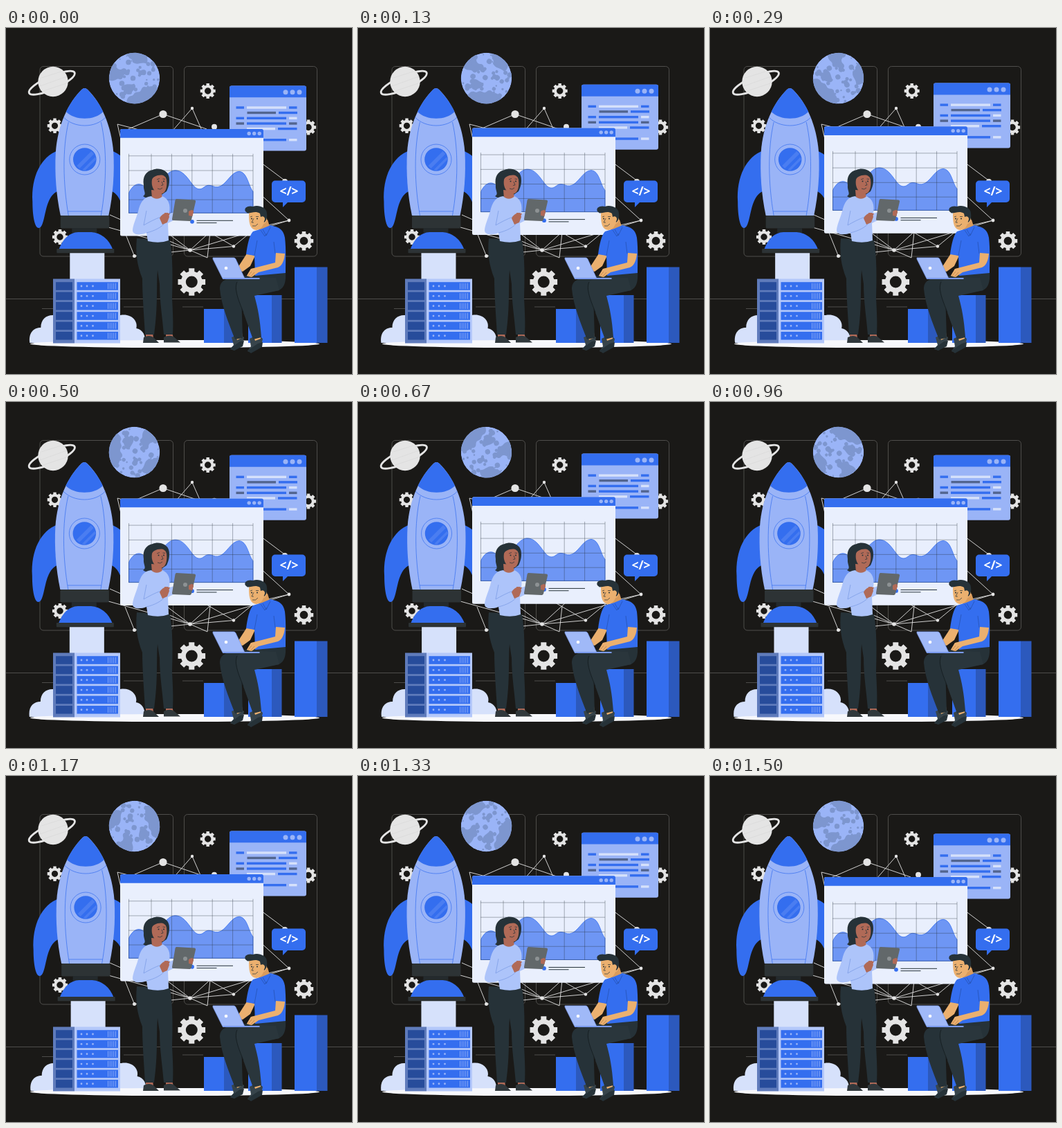
These frames come from a looping animation (500 by 500 pixels, 1540 ms). An HTML page:

```html
<!DOCTYPE html>
<html lang="en">
<head>
<meta charset="utf-8">
<style>
html, body { margin: 0; width: 100%; height: 100%; overflow: hidden; background: #1a1917; }
svg { display: block; width: 100vw; height: 100vh; }
.b { fill: #346eef; } .l { fill: #9ab4f7; } .p { fill: #d6e1fb; } .d { fill: #263238; }
.n { fill: #2c59bd; } .g { fill: #e4e4e4; } .w { fill: #b06a57; } .m { fill: #ebb06f; }
.line { fill: none; stroke: #346eef; stroke-width: .7; }
.ink { fill: none; stroke: #263238; stroke-width: .7; }
</style>
</head>
<body>
<svg viewBox="0 0 500 500">
  <defs><clipPath id="disc"><circle r="36.8"/></clipPath></defs>

  <g fill="none" stroke="#5c5b59" stroke-width=".8">
    <rect x="49" y="55.5" width="192.5" height="274.5" rx="5"/>
    <rect x="257.5" y="55.5" width="192" height="274.5" rx="5"/>
    <path d="M0 391.5H500M52 405.5H70M170 403H200M255 403H285"/>
  </g>
  <g id="gears" class="g"></g>

  <g stroke="#e4e4e4" stroke-width=".9" fill="none">
    <path d="M170 178L161 139L200 149M170 149L227 124.5L290 146M241 148L269 116L284 150M365 192L405 222M365 238L409 278L365 288M409 278L266 321L148 288M150 270L266 321L329 315.5L372 280M172 296L185.5 329.5L266 321L291 332L295 295M266 321L225 290M266 321L300 290M329 315.5L285 290"/>
  </g>
  <g id="nodes" class="g"></g>

  <ellipse cx="66.300" cy="79.200" rx="36" ry="9.500" transform="rotate(-24 66.300 79.200)" fill="none" stroke="#e4e4e4" stroke-width="2.900"/>
  <circle cx="68" cy="77.500" r="21.700" class="g"/>
  <path d="M51 72L80 63M49 84L88 70M54 91L87 80" stroke="#dadada" stroke-width=".8"/>

  <g transform="translate(185.500 72.600)"><g id="moon" clip-path="url(#disc)" fill="#7d96cf">
    <circle r="36.800" class="l"/>
    <path transform="rotate(30)" d="M37 -6C27 -9 25 1 19 2C14 6 21 10 15 14C9 18 15 21 9 25C5 31 12 37 12 40L40 30Z"/>
    <path d="M-35 -14C-27 -17 -25 -9 -19 -12C-14 -16 -9 -10 -12 -5C-19 -5 -14 3 -21 3C-26 0 -27 8 -37 5Z"/>
    <path d="M-14 -37C-12 -27 -5 -30 -3 -23C3 -18 9 -25 16 -22C20 -28 14 -33 16 -39Z"/>
    <path d="M-18 14C-11 6 -5 11 0 8C6 13 -1 17 -4 23C-12 27 -11 18 -18 14Z"/>
  </g></g>

  <g class="float">
    <rect x="323" y="83.200" width="111" height="94" rx="3" class="l"/>
    <path d="M323 100V86.200a3 3 0 0 1 3-3H431a3 3 0 0 1 3 3V100Z" class="b"/>
    <g id="code"></g>
  </g>

  <g id="rocket">
    <path d="M92 320H142V440H92Z" class="p"/>
    <path d="M34 455C32 440 40 433 50 433C50 420 59 414 69 415H165C180 412 191 423 188 434C198 436 202 445 200 455Z" class="p"/>
    <path id="fin" d="M75 177C50 186 36 215 38 251C38 271 41 289 47 289C54 289 55 268 60 254C65 241 70 237 77 235Z" class="b"/>
    <use href="#fin" transform="translate(226.600) scale(-1 1)"/>
    <path d="M78.500 271C72 240 70 210 71.500 180C74 140 90 108 109 89Q113.300 85 117.600 89C137 108 152 140 155 180C156.500 210 154.500 240 148 271Z" class="l"/>
    <path d="M86.500 121C93 108 100 98 109 89Q113.300 85 117.600 89C126 98 134 108 140 121C128 134 99 134 86.500 121Z" class="b"/>
    <path d="M83 129C98 145 129 145 143.500 129M90 136C81 175 82 225 90 271M137 136C146 175 145 225 137 271M89 265H138" class="line"/>
    <circle cx="113.500" cy="190" r="22" class="line"/>
    <circle cx="113.500" cy="190" r="16.800" class="b"/>
    <path d="M102 199L123 178L127 182L106 203ZM110 205L128.500 186.500L130 190L114 206Z" fill="#4a7df1"/>
    <rect x="78.500" y="271" width="70.500" height="18.500" rx="2" fill="#2d3335"/>
    <path d="M95 289H131V296H95Z" fill="#242a2d"/>
    <path d="M76 320Q85 296 104 295H123Q145 297 154 320Z" class="b"/>
    <rect x="73" y="319" width="83" height="6.300" rx="1" fill="#2d3335"/>
  </g>

  <ellipse cx="244" cy="456.500" rx="209" ry="5.600" fill="#f7f8fc"/>
  <g id="server">
    <path d="M68 362.500H99V455.500H68Z" fill="#5f7bbb"/>
    <path d="M99 362.500H165V455.500H99Z" fill="#b4c8fa"/>
  </g>

  <g class="float">
    <rect x="165" y="145.800" width="207" height="154.500" rx="2.500" fill="#e9effd"/>
    <path d="M165 158.500V148.300a2.500 2.500 0 0 1 2.500-2.500H369.500a2.500 2.500 0 0 1 2.500 2.500V158.500Z" class="b"/>
    <path d="M177.500 267V238C184 224 194 222 201 230C216 243 228 206 244 205.500C262 205 268 232 279 232.500C285 233 287 227 293 227C299 227 300 230 306 229.500C318 228 325 207 337 207C349 208 350 228 357 236V267Z" fill="#6e96f4" stroke="#346eef" stroke-width=".8"/>
    <path id="grid" class="ink" style="stroke-width:.5;opacity:.75"/>
    <g id="dots" class="l"></g>
    <circle cx="269" cy="279.500" r="2.900" class="b"/>
    <path d="M275.500 278H328M275.500 281.300H304.500" class="ink" style="stroke-width:1"/>
  </g>

  <path d="M389 220.500H428a5 5 0 0 1 5 5V247a5 5 0 0 1-5 5H407L400 259V252H389a5 5 0 0 1-5-5V225.500a5 5 0 0 1 5-5Z" class="b"/>
  <text x="409" y="242.300" text-anchor="middle" font-family="'Open Sans', sans-serif" font-weight="700" font-size="17.500" fill="#fff">&lt;/&gt;</text>

  <path d="M286 406H315V455H286ZM350 386H384V455H350ZM417 345.500H449V455H417Z" class="b"/>
  <path d="M315 406H329V455H315ZM384 386H398.500V455H384ZM449 345.500H464.500V455H449Z" class="n"/>

  <g id="woman">
    <path d="M212 205C220 201 234 205 235.500 215C237 223 235 230 232 236L222 243C215 247 204 248 198 243C204 240 198 235 199 227C197 215 202 207 212 205Z" class="d"/>
    <path d="M210 234L211 246C216 252 224 250 226 245L224 235Z" class="w"/>
    <path d="M211 219C214 209 228 208 231 215C234 225 232 238 225 239.500C216 240 209 231 211 219Z" class="w"/>
    <path d="M206 232C206 221 212 215 219 213C225 212 229 212 232 218C234 207 219 202 211 208C202 214 201 227 206 232Z" class="d"/>
    <path d="M218 219L222 217.500M226.500 218L230 218.500M225 222L227 227L224 227.500M219 232Q223 234.500 226 231" class="ink"/>
    <circle cx="220.500" cy="221.500" r="1" class="d"/><circle cx="228" cy="221.500" r="1" class="d"/>
    <path d="M202 440H212L213 448H202ZM231 440H240L242 448H231Z" class="w"/>
    <path d="M199 447Q207 443 213 447L221 455H198ZM228 447Q235 443 242 446L252 454.500H228Z" fill="#30383c"/>
    <path d="M189 304L237 307C241 330 241 360 240 390C241 410 242 427 241 443H228C226 418 222 395 222 370L219 350C217 375 220 400 214 443H201C199 410 197 385 197 362C189 342 187 324 189 304Z" class="d"/>
    <path d="M210 243C199 244 194 252 191 265C187 278 183 286 183 293C184 300 196 299 203 296L205 308Q222 312 235 307L234 282L246 276L244 266L236 268C238 255 235 247 226 243C222 248 214 248 210 243Z" fill="#adc4fa"/>
    <path d="M203 296C215 293 225 288 230 281L224 273C215 276 206 281 199 285L203 264" fill="#adc4fa" stroke="#7898e3" stroke-width=".7"/>
    <path d="M222 275Q226 267 234 267L236 273L233 281L226 284ZM262 265Q270 260 271 266L269 273L263 274Z" class="w"/>
    <path d="M246.500 247L272 248.500Q274.500 249 274 251L268 277Q267 279.500 265 279L241.500 278Q239.500 278 240 276L244.500 249Q245 247 246.500 247Z" fill="#62686a"/>
    <circle cx="259" cy="264" r="3" fill="#8d9294"/>
    <path d="M264 265Q270 261 271 265L269 272L264 271ZM229 267L237 268L235 272L229 274Z" class="w"/>
  </g>

  <g id="man">
    <path d="M367 279L378 277L382 290L371 298L365 292Z" fill="#d99b5c"/>
    <path d="M351 269C351 261 372 259 374 272C379 272 378 282 372 283C370 290 364 293 359 291.500C352 289 351 280 351 269Z" class="m"/>
    <path d="M346 265C343 259 351 256 357 258C364 255 377 259 377 268C378 274 376 279 373 281L371 273L368 273L367 268C361 264 356 267 349 267.500Z" class="d"/>
    <path d="M368 273C374 270 377 278 370 282Z" class="m"/>
    <path d="M353 273L356 272M361 272.500L365 272.500M358 275L355 281H358M356 286Q361 287.500 364 283" class="ink"/>
    <circle cx="355" cy="275.500" r="1" class="d"/><circle cx="363" cy="275.500" r="1" class="d"/>
    <path d="M326 447L337 443L344 447L341 459L330 466L324 464L329 458ZM352 449L364 443L371 449L369 459L354 469L349 467L354 460Z" fill="#37444b"/>
    <path d="M331 442L341 440L342 447L334 451ZM357 443L368 442L368 449L360 452Z" class="m"/>
    <path d="M324 463L338 453L344 452L342 460L330 466ZM349 466L364 456L371 454L370 461L354 470Z" class="d"/>
    <path d="M365 354L404 352C405 368 402 379 389 380C374 383 357 386 340 384L342 448L331 450C321 425 311 400 309 377C309 364 320 361 333 361Z" class="d"/>
    <path d="M390 361C365 360 346 358 335 366C329 375 336 395 343 411L357 450L369 447C367 420 364 405 359 387L395 379Z" fill="#2a363c"/>
    <path d="M334 367C328 378 340 402 343 411" class="ink" style="stroke:#101719"/>
    <path d="M348 326L360 329L353 344L342 352L334 350L337 343Z" class="m"/>
    <path d="M370 290L382 285C396 288 401 292 403 303C405 320 404 339 404 354L360 358L359 329L347 327C349 312 352 299 357 294Z" class="b"/>
    <path d="M359 329L363 307M371 291L376 300L382 288M368 292L374 301L377 297M389 326L387 309" class="line" style="stroke:#2450ad"/>
    <path d="M390 325L403 326C402 338 398 344 393 346L365 353L355 360L348 358L354 348L389 339Z" class="m"/>
    <path d="M299 332H329Q331 332 332 334L345 362H313L299 334Z" fill="#a0b9f8" stroke="#7b9bef" stroke-width=".7"/>
    <circle cx="318" cy="347" r="2.300" fill="#fff"/>
    <path d="M313 361H366.500V363H313Z" fill="#7b9bef"/>
    <path d="M348 358L354 348L365 347L363 353L354 360Z" class="m"/>
    <path d="M350 358L355 352M353 360L359 353" class="ink" style="stroke:#b57b43"/>
  </g>
</svg>
<script>
const $ = id => document.getElementById(id);
const add = (id, markup) => $(id).insertAdjacentHTML('beforeend', markup);
const circles = (id, list) => list.forEach(([x, y, r]) => add(id, `<circle cx="${x}" cy="${y}" r="${r}"/>`));
const bar = (x, y, w, h, cls) => `<rect x="${x}" y="${y}" width="${w}" height="${h}" class="${cls}"/>`;

function gear(x, y, r) {
  const points = [];
  for (let i = 0; i < 8; i++)
    for (const [turn, k] of [[-.26, .77], [-.2, 1], [.2, 1], [.26, .77]]) {
      const a = i * Math.PI / 4 + turn;
      points.push((x + r * k * Math.cos(a)).toFixed(2) + ' ' + (y + r * k * Math.sin(a)).toFixed(2));
    }
  const h = r * .42;
  add('gears', `<path fill-rule="evenodd" d="M${points.join('L')}ZM${x - h} ${y}a${h} ${h} 0 1 0 ${2 * h} 0a${h} ${h} 0 1 0 ${-2 * h} 0Z"/>`);
}
[[70.5, 141.3, 11], [291.7, 91, 11.2], [437, 143.5, 11.3], [430.5, 307.7, 14], [78, 302, 11.3], [268.3, 367, 20.2]]
  .forEach(g => gear(...g));

circles('nodes', [[227, 124.5, 5.6], [269, 116, 2.2], [301, 142.8, 4], [409, 278, 2.4],
  [185.5, 329.5, 2.5], [266, 321, 2.8], [329, 315.5, 2.2], [403, 222, 4]]);
circles('dots', [[351.2, 152.2, 2.7], [358.7, 152.2, 2.7], [366.2, 152.2, 2.7]]);
circles('code', [[404, 92.5, 3.5], [414, 92.5, 3.5], [424, 92.5, 3.5]]);
document.querySelectorAll('#code circle').forEach(c => c.setAttribute('class', 'l'));

// small craters
let seed = 7;
const random = () => (seed = seed * 16807 % 2147483647) / 2147483647;
circles('moon', Array.from({ length: 48 }, () => {
  const a = random() * 6.283, d = 36 * Math.sqrt(random());
  return [d * Math.cos(a), d * Math.sin(a), 1 + 3 * random()];
}));

// code rows: y, then x, width, colour
[[113, 332.5, 11.5, 'b', 348, 57, 'p', 409, 11.5, 'b'], [120.5, 348.5, 41.5, 'ink', 394, 27, 'b'],
 [128.3, 332.5, 11.5, 'b', 348, 57, 'b', 409, 11.5, 'p'], [136, 332.5, 11.5, 'ink', 348, 57, 'b', 409, 11.5, 'ink'],
 [143.6, 348, 41, 'p', 393, 27.5, 'b'], [159.7, 348, 57, 'b', 409, 11.5, 'p']]
  .forEach(([y, ...row]) => {
    for (let i = 0; i < row.length; i += 3)
      add('code', row[i + 2] === 'ink'
        ? `<rect x="${row[i]}" y="${y}" width="${row[i + 1]}" height="3.4" fill="#52658f"/>`
        : bar(row[i], y, row[i + 1], 3.4, row[i + 2]));
  });

let grid = 'M177.5 181.5V267';
for (let i = 0; i < 6; i++) grid += `M${210 + i * 29.4} 181.5V267`;
for (const y of [184.5, 205.7, 226.9, 247.8, 267]) grid += `M177 ${y}H357`;
$('grid').setAttribute('d', grid);

for (let i = 0; i < 6; i++) {
  const y = 367.2 + i * 14.35;
  add('server', `<rect x="72" y="${y}" width="24" height="11.6" fill="#274c9b"/>` + bar(102.5, y, 59.5, 11.6, 'b'));
  for (const x of [109, 117, 125.5]) add('server', `<circle cx="${x}" cy="${y + 5.8}" r="1.4" class="l"/>`);
  for (let x = 147; x < 160; x += 2.8) add('server', bar(x, y + 1.5, .8, 8.6, 'l'));
}

const shake = [0, -1, 2, -4, 4, -4, 4, -4, 2, -1, 0];
const floats = document.querySelectorAll('.float');
const LOOP = 1540, STEP = 1000 / 24;

function draw() {
  const step = Math.floor((performance.now() % LOOP + 5) / STEP);
  const p = (step + .35) / 36 % 1;
  const i = Math.floor(p * 10);
  const dx = .4 + shake[i] + (shake[i + 1] - shake[i]) * (p * 10 - i);
  const dy = .5 - 10 * (1 - Math.abs(1 - 2 * p));
  $('rocket').setAttribute('transform', `translate(${dx} 0)`);
  floats.forEach(f => f.setAttribute('transform', `translate(0 ${dy})`));
  $('moon').setAttribute('transform', `rotate(${p * 360})`);
  requestAnimationFrame(draw);
}
draw();
</script>
</body>
</html>
```
